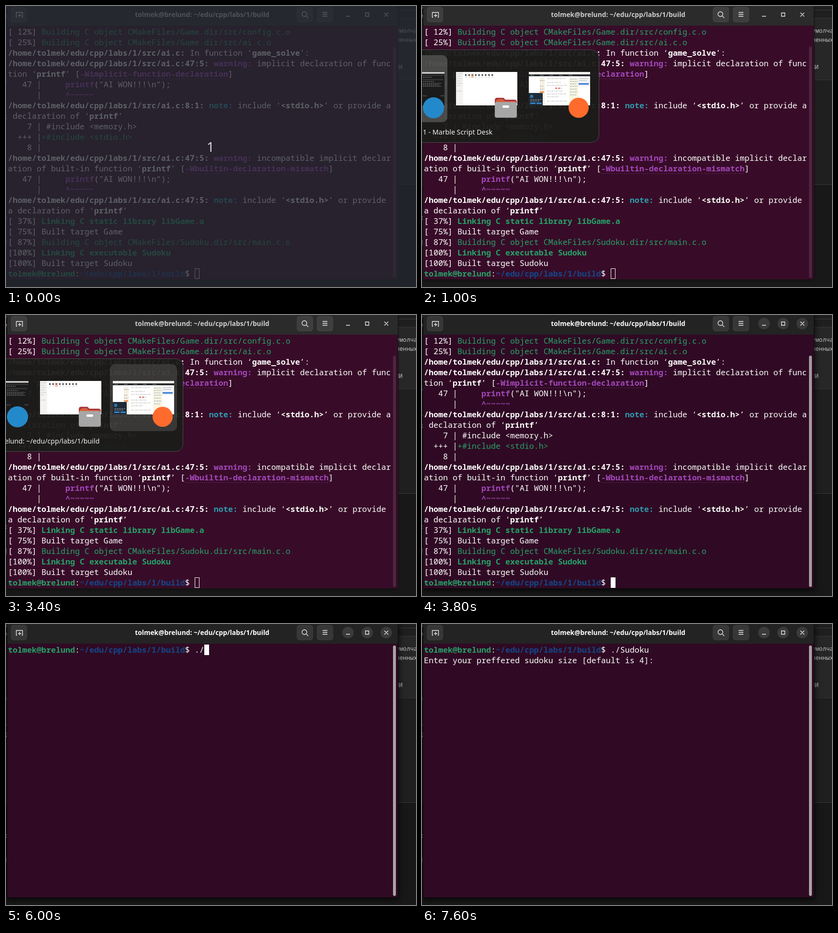
An HTML page that plays this animation: 856 px wide and 588 px high, repeating every 8000 ms.

```html
<!DOCTYPE html>
<html lang="en">
<head>
<meta charset="utf-8">
<title>Terminal session</title>
<style>
  html, body { margin: 0; width: 100%; height: 100%; overflow: hidden; background: #181818; }
  #stage { position: relative; width: 856px; height: 588px; overflow: hidden; --focus: 0; }
  #stage > *, .window > *, .bar > * { position: absolute; }
  svg { left: 0; top: 0; }
  .window { left: 3px; top: 0; width: 815px; height: 572px; background: #380c28; box-shadow: 0 0 0 1px #111, 0 2px 6px #0006; }
  .active { inset: 0; background: #300a24; box-shadow: 0 3px 14px 2px #0009; opacity: var(--focus); }
  .bar { left: 0; top: 0; width: 815px; height: 41px; background: #2b2b2b; }
  .bar .active { background: #232323; box-shadow: none; }
  .title { left: 0; width: 813px; top: 7px; text-align: center; color: #fff;
    font: 600 13.8px/22px "Noto Sans", sans-serif; opacity: calc(.76 + .24 * var(--focus)); }
  .term { left: 1px; top: 43px; color: #fff; font: 16.667px/22px "Noto Sans Mono", monospace; white-space: pre; }
  #log div { height: 22px; }
  b { font-weight: 700; }
  .g { color: #26a269; } .p { color: #a347ba; } .c { color: #2f9db0; } .n { color: #12488b; }
  .link { background: linear-gradient(90deg, #a347ba 1px, transparent 1px) 0 100% / 4px 1px repeat-x; }
  #cursor { display: inline-block; box-sizing: border-box; width: 10px; height: 22px; border: 1px solid #fff; vertical-align: top; }
  #scroll { left: 805px; bottom: 3px; width: 6px; border-radius: 3px; background: #a9a3a5; opacity: calc(.18 + .82 * var(--focus)); }
  #dim { inset: 0; background: rgba(36, 41, 49, .74); }
  #count { left: 377px; width: 100px; top: 274px; text-align: center; color: #d2d5d8; font: 300 28px/40px "Noto Sans", sans-serif; }
  #switcher { left: 0; top: 0; width: 856px; height: 588px; }
  #label { font: 14.2px "Noto Sans", sans-serif; fill: #f2f2f2; }
</style>
</head>
<body>
<div id="stage">
  <svg width="856" height="588">
    <rect width="856" height="588" fill="#181818"/>
    <rect width="856" height="373" fill="#1f1f1f"/>
    <path d="M0 373.5H856M818 8.5H856" stroke="#3a3a3a"/>
    <path d="M700 25.5H860V154.5H700z" fill="#272727" stroke="#383838"/>
    <g font-family="Noto Sans Mono, monospace" font-size="12.4" fill="#c4c4c4">
      <text x="814" y="56">умолча</text><text x="814" y="75">ленных</text><text x="813" y="132">ИИ</text>
      <text x="-5" y="25">e</text><text x="-4" y="158" fill="#4fa8d8">i</text><text x="-5" y="215" fill="#d7ba4a">+</text>
      <text x="-3" y="235">;</text><text x="-3" y="447">:</text><text x="-4" y="498">]</text>
    </g>
    <path d="M0 6L3 0" stroke="#4f8fc0"/>
  </svg>

  <div class="window">
    <div class="active"></div>
    <div class="bar">
      <div class="active"></div>
      <div class="title"></div>
      <svg width="815" height="41" fill="none" stroke="#f0f0f0" stroke-width="1.3">
        <g fill="#fff" fill-opacity=".09" stroke="#fff" stroke-opacity=".08" stroke-width="1">
          <rect x="7.5" y="2.5" width="33" height="31" rx="5"/>
          <rect x="604.5" y="2.5" width="33" height="31" rx="5"/>
          <rect x="646.5" y="2.5" width="33" height="31" rx="5"/>
        </g>
        <g fill="#3b3b3b" stroke="none" style="opacity:var(--focus)">
          <circle cx="711" cy="18" r="12"/><circle cx="751" cy="18" r="12"/><circle cx="791" cy="18" r="12"/>
        </g>
        <path d="M20 23.5H18.5V13.5H31.5V23.5H30M22 20H29M25.5 16.5V23.5"/>
        <circle cx="620" cy="17" r="5"/><path d="M624 21L628 25"/>
        <path d="M658 13.5H668M658 17.5H668M658 21.5H668M707 21.5H715M747.5 14.5H754.5V21.5H747.5zM787 14L795 22M795 14L787 22"/>
      </svg>
    </div>
    <div class="term"><div id="log"></div><span id="prompt"></span><span id="typed"></span><span id="cursor"></span></div>
    <div id="scroll"></div>
  </div>

  <div id="dim"></div>
  <div id="count">1</div>

  <svg id="switcher">
    <rect x="-251.5" y="91.5" width="621" height="194" rx="16" fill="#1b1c1a" fill-opacity=".95" stroke="#4b4c4a"/>
    <g fill="#fff" fill-opacity=".2">
      <rect class="pick" x="-87" y="103" width="140" height="140" rx="10"/>
      <rect class="pick" x="65" y="103" width="140" height="140" rx="10"/>
      <rect class="pick" x="217" y="103" width="140" height="140" rx="10"/>
    </g>
    <g>
      <rect x="-81" y="138" width="128" height="70" fill="#1b1b1b"/>
      <path d="M0 140H47" stroke="#e8e8e8" stroke-width="3"/>
      <path d="M0 145H47M2 154H44" stroke="#333" stroke-width="3"/>
      <path d="M2 149H20M2 158H26M2 162H40M2 165H36M2 168H40M2 188H10M39 188H46" stroke="#888" stroke-dasharray="3 1"/>
      <circle cx="24" cy="213" r="22" fill="#2489ca"/>
    </g>
    <g>
      <rect x="71" y="138" width="128" height="70" fill="#fff"/>
      <path d="M71 138H86V208H71z" fill="#f3f3f3"/>
      <path d="M73 142H84M73 147H81M73 152H83M73 157H82M73 162H84M73 167H80M73 178H83" stroke="#aaa" stroke-dasharray="2 1"/>
      <path d="M90 144.5H149" stroke="#333" stroke-width="3" stroke-dasharray="3 3.9"/>
      <path d="M90 148.5H149" stroke="#bbb" stroke-dasharray="4 2.9"/>
      <path d="M102 141.5H108V150H102z" fill="#e98a55" fill-opacity=".45"/>
      <path d="M152 197Q152 192 157 192H170L174 196H193Q198 196 198 201V214H152z" fill="#a8383f"/>
      <path d="M154 199Q160 193 168 195L173 199H196V203H154z" fill="#d7603c"/>
      <rect x="152" y="201" width="46" height="33" rx="4" fill="#a6a6a6"/>
      <path d="M153 231.5Q154 233.5 157 233.5H193Q196 233.5 197 231.5" fill="none" stroke="#858585"/>
      <rect x="168" y="208" width="14" height="5" rx="2" fill="#fff"/>
    </g>
    <g>
      <rect x="223" y="138" width="128" height="70" fill="#fff"/>
      <path d="M223 139H351" stroke="#f0efe8" stroke-width="2"/>
      <path d="M223 145H351" stroke="#282a2d" stroke-width="4"/>
      <path d="M226 145H320" stroke="#999" stroke-dasharray="8 12"/>
      <path d="M246 150H256V208H246z" fill="#f5f0e2"/>
      <path d="M246 156H256M246 168H254M246 174H255" stroke="#999" stroke-dasharray="3 1"/>
      <path d="M246 180H255" stroke="#e98a4b" stroke-width="3"/>
      <path d="M261 152H300M261 160H290M261 166H303M261 178H294M261 184H301M261 190H286M261 199H303" stroke="#b4b4b4" stroke-dasharray="5 1 2 1"/>
      <path d="M278 172H291" stroke="#d05048" stroke-width="2" stroke-dasharray="4 2"/>
      <path d="M307 150H326V208H307z" fill="#fbf5df"/>
      <path d="M309 153H324M309 158H325M309 163H322M309 168H325M309 174H323M309 180H325M309 186H322" stroke="#7ca4c4" stroke-dasharray="4 1"/>
      <path d="M325 148H350V167H325z" fill="#f4f5f7" stroke="#ccc" stroke-width=".5"/>
      <path d="M328 152H347M328 156H344" stroke="#aaa"/><path d="M327 163H348" stroke="#2d76d2" stroke-width="3"/>
      <path d="M223 182H252V208H223z" fill="#202b38"/><circle cx="229" cy="189" r="3.5" fill="#36729e"/>
      <path d="M226 196H249M226 199H246" stroke="#9aa7b3" stroke-dasharray="4 1"/>
      <path d="M226 203.5H250" stroke="#3785c6" stroke-width="3" stroke-dasharray="11 2"/>
      <circle cx="327" cy="213" r="21" fill="#ff6b2c"/>
    </g>
    <text id="label" y="269"></text>
  </svg>
</div>
<script>
const $ = id => document.getElementById(id);
const user = 'tolmek', host = 'brelund', cwd = '~/edu/cpp/labs/1/build';
const title = `${user}@${host}: ${cwd}`;
const esc = s => s.replace(/</g, '&lt;');
const bold = (s, color = '') => `<b class="${color}">${esc(s)}</b>`;
const green = s => `<span class="g">${esc(s)}</span>`;
const quote = s => `‘${bold(s)}’`;
const at = pos => bold(`/home/${user}/edu/cpp/labs/1/src/ai.c:${pos}`) + ' ';
const flag = s => `[${bold(s, 'p link')}]`;
const building = s => green(`Building C object CMakeFiles/${s}.c.o`);
const warning = bold('warning:', 'p'), note = bold('note:', 'c');
const snippet = [`   47 |     ${bold('printf', 'p')}("AI WON!!!\\n");`, `      |     ${bold('^~~~~~', 'p')}`];

const lines = [
  `[ 12%] ${building('Game.dir/src/config')}`,
  `[ 25%] ${building('Game.dir/src/ai')}`,
  `${at('')}In function ${quote('game_solve')}:`,
  `${at('47:5:')}${warning} implicit declaration of func`,
  `tion ${quote('printf')} ${flag('-Wimplicit-function-declaration')}`,
  ...snippet,
  `${at('8:1:')}${note} include ${quote('<stdio.h>')} or provide a`,
  ` declaration of ${quote('printf')}`,
  esc('    7 | #include <memory.h>'),
  `  +++ |${green('+#include <stdio.h>')}`,
  '    8 |',
  `${at('47:5:')}${warning} incompatible implicit declar`,
  `ation of built-in function ${quote('printf')} ${flag('-Wbuiltin-declaration-mismatch')}`,
  ...snippet,
  `${at('47:5:')}${note} include ${quote('<stdio.h>')} or provide`,
  `a declaration of ${quote('printf')}`,
  `[ 37%] ${bold('Linking C static library libGame.a', 'g')}`,
  '[ 75%] Built target Game',
  `[ 87%] ${building('Sudoku.dir/src/main')}`,
  `[100%] ${bold('Linking C executable Sudoku', 'g')}`,
  '[100%] Built target Sudoku'
];
$('log').innerHTML = lines.map(l => `<div>${l}</div>`).join('');
$('prompt').innerHTML = `${bold(`${user}@${host}`, 'g')}:${bold(cwd, 'n')}$ `;
document.querySelector('.title').textContent = title;

// Each entry: start time, then the value from that time on.
const typing = [
  [0, ''], [4400, 'c'], [4600, 'cl'], [4700, 'cle'], [4800, 'clea'], [4900, 'clear'],
  [5100, ''], [5800, '.'], [6000, './'], [6200, './S'], [6400, './Su'], [6700, './Sudoku '],
  [7100, './Sudoku\nEnter your preffered sudoku size [default is 4]: ']
];
const cursorOn = [[0, 1], [4300, 0], [4400, 1], [5600, 0], [5800, 1], [7600, 0]];
const focus = [[0, 0], [3700, .5], [3800, .95], [3900, 1]];
const panel = [[0, 0], [500, 1], [3700, .45], [3800, 0]];
const picks = [
  [0, [1, 0, 0]], [3100, [.62, .55, 0]], [3200, [0, 1, 0]],
  [3300, [0, .55, .55]], [3400, [0, 0, .62]], [3500, [0, 0, 0]]
];
const labels = [[0, '- 1 - Marble Script Desk'], [3100, 'Videos'], [3300, 'New Tab'], [3400, title]];
const valueAt = (track, t) => track.findLast(([start]) => t >= start)[1];
const pickBoxes = document.querySelectorAll('.pick');

function render(t) {
  const f = valueAt(focus, t), cleared = t >= 5100, label = $('label');
  $('stage').style.setProperty('--focus', f);
  $('dim').hidden = $('count').hidden = t >= 1000;
  $('switcher').style.opacity = valueAt(panel, t);
  valueAt(picks, t).forEach((o, i) => pickBoxes[i].style.opacity = o);
  label.textContent = valueAt(labels, t);
  label.setAttribute('x', t < 3100 ? 147 : 59.5);
  label.setAttribute('text-anchor', t < 3100 ? 'end' : 'middle');
  $('log').hidden = cleared;
  $('typed').textContent = valueAt(typing, t);
  $('cursor').style.background = f ? '#fff' : 'none';
  $('cursor').style.opacity = valueAt(cursorOn, t);
  $('scroll').style.top = (cleared ? 45 : 85) + 'px';
}
function tick() {
  render(performance.now() % 8000);
  requestAnimationFrame(tick);
}
tick();
</script>
</body>
</html>
```
